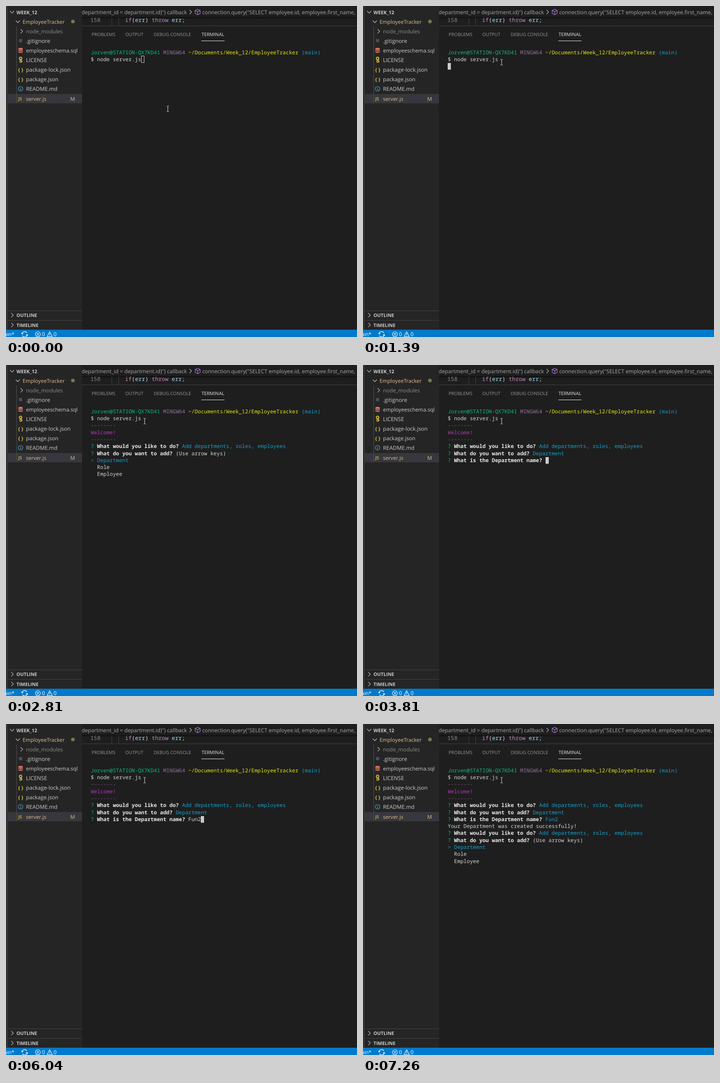
These frames come from a looping animation (771 px wide and 726 px high, 8 s). An HTML page:

```html
<!DOCTYPE html>
<html lang="en">
<head>
<meta charset="utf-8">
<title>Terminal session</title>
<style>
  html, body { margin: 0; width: 100%; height: 100%; overflow: hidden; background: #1e1e1e; }
  svg { display: block; width: 771px; height: 726px; }
  text { font-family: "Open Sans", "Noto Sans", sans-serif; white-space: pre; text-rendering: geometricPrecision; }
  .mono { font-family: "Noto Sans Mono", "DejaVu Sans Mono", monospace; }
  .line { fill: none; stroke: #c5c5c5; stroke-width: 1.1; }
</style>
</head>
<body>
<svg viewBox="0 0 771 726">
  <defs>
    <linearGradient id="shade" x2="0" y2="1">
      <stop stop-color="#000" stop-opacity=".45"/>
      <stop offset="1" stop-color="#000" stop-opacity="0"/>
    </linearGradient>
    <clipPath id="editor"><rect x="167" width="604" height="43"/></clipPath>
  </defs>
  <rect width="771" height="726" fill="#1e1e1e"/>
  <rect width="4" height="710" fill="#333"/>
  <rect x="4" width="163" height="710" fill="#252526"/>
  <rect x="4" y="193" width="163" height="20.5" fill="#37373d"/>
  <path d="M23.5 45V213" stroke="#505050"/>
  <path d="M4 668.5H167M4 689.5H167" stroke="#434344"/>
  <rect x="167" y="24" width="604" height="5" fill="url(#shade)"/>
  <path d="M232.5 25V43M247.5 25V43" stroke="#404040"/>
  <path d="M167 43.5H771" stroke="#414141"/>
  <path d="M429 76.5H480" stroke="#e7e7e7"/>
  <rect y="710" width="771" height="16" fill="#007acc"/>

  <g class="line">
    <path d="M9 11l4.5 4.7 4.5-4.7M21.5 32l4.5 4.7 4.5-4.7"/>
    <path d="M32 51l4.7 4.6-4.7 4.6M11.5 673.7l4.7 4.6-4.7 4.6M11.5 695.2l4.7 4.6-4.7 4.6M403 8.7l4.7 4.6-4.7 4.6"/>
    <path stroke="#b180d7" d="M421 7l5.5 2.8v6.4l-5.5 3-5.500-3V9.800zM415.5 9.800l5.5 2.800 5.5-2.800M421 12.600v6.600"/>
    <g stroke="#fff">
      <path d="M35.5 719a5.500 5.500 0 0 1 10.300-2M46.500 721a5.500 5.500 0 0 1-10.300 2M34 717l1.500 2.500 2.500-1.500M48 723l-1.500-2.500-2.500 1.500" stroke-width="1.3"/>
      <circle cx="70" cy="720" r="5.5"/>
      <path d="M67.500 717.500l5 5m0-5l-5 5M96 714.500l5.700 10.500H90.300zM96 718v3.700m0 1v1"/>
    </g>
  </g>
  <circle cx="147" cy="34" r="4" fill="#73784f"/>

  <rect x="28.5" y="72.5" width="7" height="7" fill="#46505f"/>
  <g fill="#d9735c">
    <ellipse cx="32" cy="94" rx="5" ry="2.2"/>
    <path d="M27 95.800q5 2.500 10 0v2q-5 2.700-10 0zM27 99.300q5 2.500 10 0v2.200q-5 2.700-10 0z"/>
  </g>
  <g fill="none" stroke="#d4b83c" stroke-width="2">
    <circle cx="32" cy="115" r="2.7"/>
    <path d="M31 118v6.500M34 118v6M34 121.500h2"/>
  </g>
  <circle cx="32" cy="181.5" r="5" fill="none" stroke="#519aba" stroke-width="1.2"/>
  <path d="M32 180.500v4m0-6.500v1.300" stroke="#519aba" stroke-width="1.4"/>

  <g id="labels"></g>
  <g id="crumbs" clip-path="url(#editor)"></g>
  <g id="terminal"></g>
  <rect id="cursor" height="14.5"/>
  <circle id="click" cx="302.5" cy="122" r="11.7" fill="#ff0" fill-opacity=".47"/>
  <path id="pointer" fill="none" stroke="#e0e0e0" d="M-2.500-6H-.700L0-5.400.700-6H2.500M0-5.400V5.400M-2.500 6H-.700L0 5.400.700 6H2.500"/>
</svg>
<script>
const LOOP = 8000;
const LEFT = 186.3, TOP = 94.7, COL = 6.912, ROW = 15.3;
const GREEN = '#0dbc79', CYAN = '#11a1cb', WHITE = '#d4d4d4', YELLOW = '#e5e510';
const $ = id => document.getElementById(id);

function write(parent, x, y, content, size, attrs = {}) {
  const node = document.createElementNS('http://www.w3.org/2000/svg', 'text');
  const all = { x, y, 'font-size': size, fill: '#ccc', ...attrs };
  for (const key in all) node.setAttribute(key, all[key]);
  node.textContent = content;
  parent.append(node);
}

function drawWorkbench() {
  const put = (...args) => write($('labels'), ...args);
  const bold = { 'font-weight': 700 };
  const gold = { fill: '#e2c08d' };
  put(23, 17.5, 'WEEK_12', 10.6, bold);
  put(36.5, 38.7, 'EmployeeTracker', 11.6, gold);
  [
    ['node_modules', 11.75, { fill: '#8c8c8c' }],
    ['.gitignore', 12.1],
    ['employeeschema.sql', 11.6],
    ['LICENSE', 12],
    ['package-lock.json', 11.9],
    ['package.json', 11.75],
    ['README.md', 11.9],
    ['server.js', 11.4, gold]
  ].forEach(([name, size, attrs], i) => put(44, 59.8 + i * 21.1, name, size, attrs));
  for (const y of [143.5, 164.6])
    put(26.5, y, '{ }', 11, { fill: '#cbb83f', 'font-weight': 700 });
  put(27, 206.8, 'JS', 9.5, { fill: '#cbcb41', 'font-weight': 600 });
  put(141, 207.6, 'M', 11.6, { fill: '#b39a83', 'font-weight': 600 });
  put(23, 682, 'OUTLINE', 10.3, bold);
  put(23, 703.5, 'TIMELINE', 10.3, bold);

  const idle = { fill: '#979797' };
  put(188, 66, 'PROBLEMS', 10.1, idle);
  put(262, 66, 'OUTPUT', 10.1, idle);
  put(324.5, 66, 'DEBUG CONSOLE', 10, idle);
  put(429.5, 66, 'TERMINAL', 10.35, { fill: '#e7e7e7' });

  const light = { fill: '#fff' };
  put(18.5, 724, 'main*', 11.2, { ...light, 'text-anchor': 'end' });
  put(79, 724, '0', 11.6, light);
  put(104.5, 724, '0', 11.6, light);

  const crumb = (...args) => write($('crumbs'), ...args);
  const path = { fill: '#a9a9a9' };
  crumb(397.5, 17.5, 'department_id = department.id)") callback', 11.8, { ...path, 'text-anchor': 'end' });
  crumb(431, 17.5, 'connection.query("SELECT employee.id, employee.first_name, ', 11.72, path);
  const code = (x, content, fill) => crumb(x, 34.6, content, 12.22, { fill, class: 'mono' });
  code(185.5, '158', '#858585');
  let x = 261.5;
  for (const [content, fill] of [['if', '#c586c0'], ['(', WHITE], ['err', '#9cdcfe'], [') ', WHITE],
    ['throw', '#c586c0'], [' err', '#9cdcfe'], [';', WHITE]]) {
    code(x, content, fill);
    x += content.length * 7.33;
  }
}

// A terminal line is a list of [text, colour, weight] runs.
const plain = content => [[content, WHITE]];
const ask = (question, answer, color = CYAN) =>
  [['? ', GREEN], [question + ' ', '#e8e8e8', 700], [answer, color]];
const menu = (question, first, ...rest) => [
  ask(question, '(Use arrow keys)', WHITE),
  [['> ' + first, CYAN]],
  ...rest.map(item => plain('  ' + item))
];

const TODO = 'What would you like to do?', ADD = 'What do you want to add?', NAME = 'What is the Department name?';
const ALL = 'Add departments, roles, employees';
const dashes = [['--------', '#86508a']];
const command = [
  [['Jorven@STATION-QX7KD41 ', GREEN], ['MINGW64 ', '#95709a'],
    ['~/Documents/Week_12/EmployeeTracker ', YELLOW, 500], ['(main)', CYAN]],
  plain('$ node server.js')
];
const welcome = [...command, dashes, [['Welcome!', '#b03bb0']], dashes];
const mainMenu = menu(TODO, ALL, 'View departments, roles, employees', 'Update employee role', 'Exit');
const addMenu = menu(ADD, 'Department', 'Role', 'Employee');
const chosen = [...welcome, ask(TODO, ALL)];
const typing = name => [...chosen, ask(ADD, 'Department'), ask(NAME, name, WHITE)];
const created = [...chosen, ask(ADD, 'Department'), ask(NAME, 'Fun2'),
  plain('Your Department was created successfully!')];

const steps = [
  { at: 0, lines: command, cursor: [16, 1], hollow: true, pointer: [355.5, 225.7] },
  { at: 200, lines: command, cursor: [16, 1], hollow: true, pointer: [316.5, 144.5] },
  { at: 380, lines: command, cursor: [16, 1], hollow: true },
  { at: 580, lines: command, cursor: [16, 1], click: true },
  { at: 770, lines: command, cursor: [16, 1] },
  { at: 1390, lines: command, cursor: [0, 2] },
  { at: 1780, lines: [...welcome, ...mainMenu] },
  { at: 2810, lines: [...chosen, ...addMenu] },
  { at: 3810, lines: typing(''), cursor: [31, 7] },
  { at: 4630, lines: typing('F'), cursor: [32, 7] },
  { at: 4840, lines: typing('Fu'), cursor: [33, 7] },
  { at: 6040, lines: typing('Fun2'), cursor: [35, 7] },
  { at: 6450, lines: [...created, ...mainMenu] },
  { at: 7260, lines: [...created, ask(TODO, ALL), ...addMenu] }
];

function show({ lines, cursor, hollow, click, pointer = [304.5, 123.3] }) {
  $('terminal').replaceChildren();
  lines.forEach((runs, row) => {
    let col = 0;
    for (const [content, fill, weight = 400] of runs) {
      write($('terminal'), LEFT + col * COL, TOP + row * ROW + 11, content, 11.52,
        { fill, 'font-weight': weight, class: 'mono' });
      col += content.length;
    }
  });
  const box = $('cursor');
  box.style.display = cursor ? '' : 'none';
  if (cursor) {
    const inset = hollow ? .5 : 0;
    box.setAttribute('x', Math.round(LEFT + cursor[0] * COL) + inset);
    box.setAttribute('y', Math.round(TOP + cursor[1] * ROW) - inset);
    box.setAttribute('width', hollow ? 6 : 7);
    box.setAttribute('fill', hollow ? 'none' : '#ccc');
    box.setAttribute('stroke', hollow ? '#ccc' : 'none');
  }
  $('click').style.display = click ? '' : 'none';
  $('pointer').setAttribute('transform', `translate(${pointer})`);
}

const start = performance.now();
let current;
function tick() {
  const time = (performance.now() - start) % LOOP;
  const step = steps.findLast(s => s.at <= time);
  if (step !== current) show(current = step);
  requestAnimationFrame(tick);
}
drawWorkbench();
tick();
</script>
</body>
</html>
```
